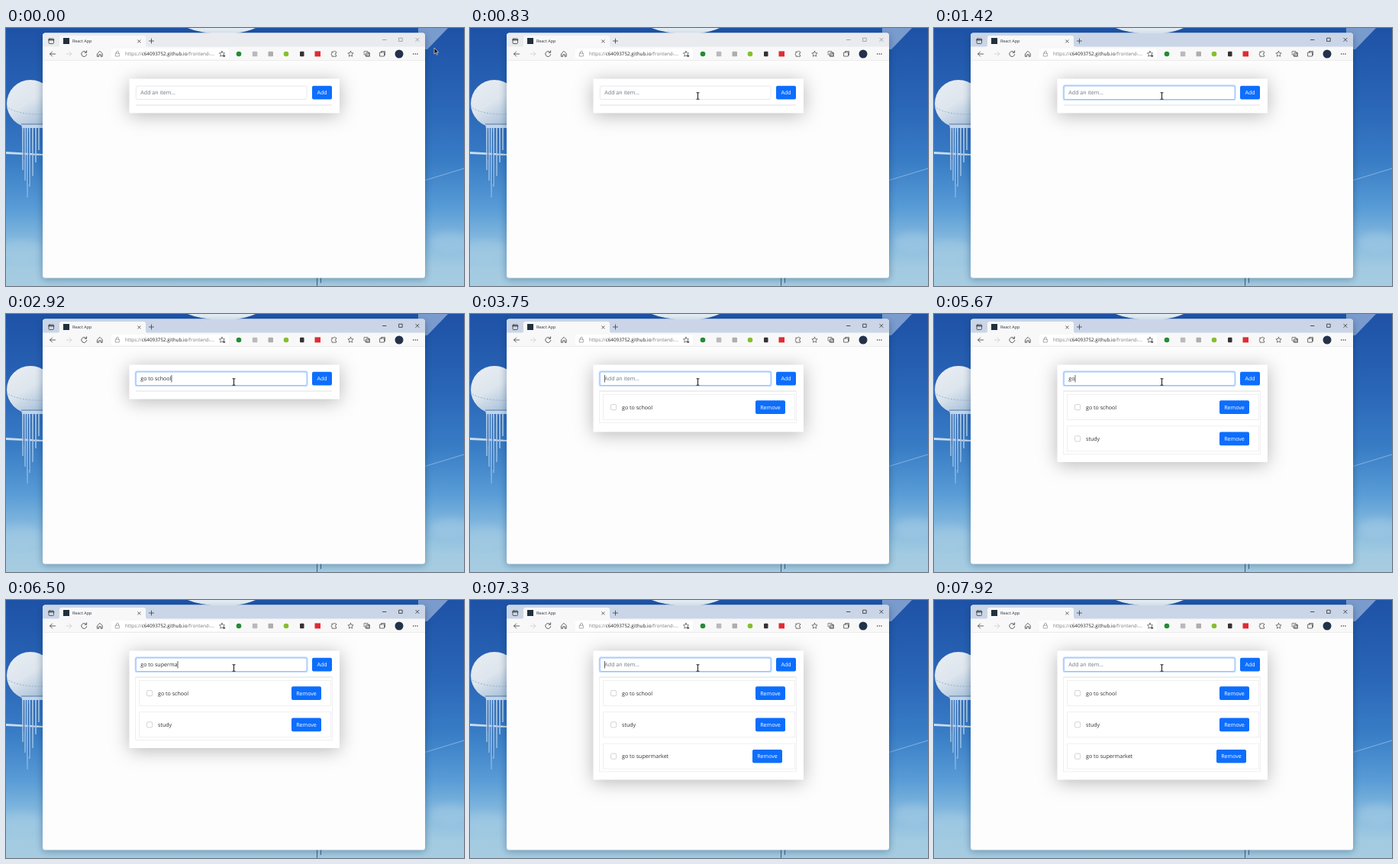
These frames come from a looping animation (600x338 px, 8000 ms). An HTML page:

```html
<!DOCTYPE html>
<html lang="en">
<head>
<meta charset="utf-8">
<title>Todo list</title>
<style>
html, body { margin: 0; width: 100%; height: 100%; overflow: hidden; background: #3577c2; }
svg { display: block; width: 100vw; height: 100vh; }
text { font: 7.1px "Open Sans", "Noto Sans", sans-serif; fill: #2b3035; white-space: pre; text-rendering: geometricPrecision; }
.mid { text-anchor: middle; fill: #fff; }
.line { fill: none; stroke: #444; stroke-width: .85; stroke-linecap: round; stroke-linejoin: round; }
.btn { fill: #0d6efd; }
.soft { fill: none; stroke: #e9e9eb; stroke-width: .7; }
.card { fill: #fff; filter: drop-shadow(0 3px 12px rgba(0,0,0,.28)); }
</style>
</head>
<body>
<svg viewBox="0 0 600 338" preserveAspectRatio="none">
  <defs>
    <linearGradient id="sky" x2="0" y2="1">
      <stop offset="0" stop-color="#1e52a6"/>
      <stop offset=".3" stop-color="#2a66b7"/>
      <stop offset=".52" stop-color="#397dc6"/>
      <stop offset=".7" stop-color="#599cd6"/>
      <stop offset=".82" stop-color="#83b8de"/>
      <stop offset=".93" stop-color="#a2cae1"/>
      <stop offset="1" stop-color="#a6cce0"/>
    </linearGradient>
    <linearGradient id="moon" x2=".6" y2="1">
      <stop offset="0" stop-color="#e9eef3"/>
      <stop offset=".55" stop-color="#dde5ed"/>
      <stop offset="1" stop-color="#a9c1da"/>
    </linearGradient>
    <linearGradient id="spire" gradientUnits="userSpaceOnUse" x1="0" y1="130" x2="0" y2="222">
      <stop offset="0" stop-color="#bdd2e8"/>
      <stop offset="1" stop-color="#7faedb"/>
    </linearGradient>
    <filter id="blur" x="-20%" y="-20%" width="140%" height="140%"><feGaussianBlur stdDeviation="5"/></filter>
    <clipPath id="page"><path d="M48 42.5H549V324q0 3.500-3.500 3.500H51.500q-3.500 0-3.500-3.500Z"/></clipPath>
  </defs>

  <!-- wallpaper -->
  <rect width="600" height="338" fill="url(#sky)"/>
  <path d="M238 0H327Q316 5 300 7H270Q250 5 238 0Z" fill="#e4edf4"/>
  <path d="M540 0H579L552 28H540Z" fill="#7a9bcd"/>
  <path d="M549 199.500L600 184" stroke="#86b1dd" stroke-width="1"/>
  <g fill="#b4d4e6" filter="url(#blur)" opacity=".35">
    <ellipse cx="20" cy="292" rx="30" ry="14"/>
    <ellipse cx="582" cy="280" rx="26" ry="13"/>
  </g>
  <path d="M0 162L48 165V167L0 165Z" fill="#cadcef"/>
  <path d="M22 128V186M25 130V200M28 130V222M31 130V208M35 130V194M39 130V176M43 130V160" stroke="url(#spire)" stroke-width="1.600"/>
  <path d="M23.500 134V172M29.600 136V204M37 134V165" stroke="#2b5f9f" stroke-width=".8"/>
  <circle cx="32" cy="99" r="31" fill="url(#moon)"/>
  <path d="M3 105Q20 114 48 113" fill="none" stroke="#8fa9c6" stroke-width=".9" stroke-dasharray="2 2"/>
  <path d="M20 126H48V131H21Z" fill="#c3d5e7"/>
  <path d="M20 126H48" stroke="#4a76ab" stroke-width="1"/>
  <path d="M407.500 327V338M412.500 327V334" stroke="#33608f" stroke-width="1"/>

  <!-- browser window -->
  <rect x="47" y="9" width="503" height="321" rx="5" fill="#0b3058" opacity=".32" filter="url(#blur)"/>
  <rect x="48" y="6.500" width="501" height="321" rx="3.500" fill="#fefdfe"/>
  <path id="bar" d="M48 25V10q0-3.500 3.500-3.500H545.500q3.500 0 3.500 3.500V25Z"/>
  <path d="M67 25q3 0 3-3V13q0-3 3-3H180q3 0 3 3V22q0 3 3 3Z" fill="#f8f8f9"/>
  <rect x="48" y="24.500" width="501" height="18" fill="#f8f8f9"/>
  <rect x="138" y="27" width="154" height="13.500" rx="2.500" fill="#fff"/>
  <path d="M48 42.500H549" stroke="#e3e3e5" stroke-width=".6"/>
  <g class="line">
    <rect x="56" y="14" width="6.500" height="6.500" rx="1"/>
    <path d="M56 15.500H62.500" stroke-width="1.700"/>
    <path d="M172.700 15.700l3.400 3.400m0-3.400l-3.400 3.400M187.500 17H193.500M190.500 14V20"/>
    <path d="M64.500 34H57.500m3-3l-3 3l3 3"/>
    <path d="M79 34H86m-3-3l3 3l-3 3" stroke="#d0d0d2"/>
    <path d="M105 31.700A3.500 3.500 0 1 0 105.800 34.500M105.600 29.800V32.200H103.200"/>
    <path d="M119.800 33.500L123 30.300L126.200 33.500V37.300H124.300V34.800H121.700V37.300H119.800Z"/>
    <path d="M143.700 33H148.300V37H143.700ZM144.600 33V31.600a1.400 1.400 0 0 1 2.800 0V33" stroke="#888" stroke-width=".7"/>
    <path id="star" d="M283 30.300l1.100 2.300l2.500.3l-1.900 1.800l.5 2.500l-2.200-1.200l-2.200 1.200l.5-2.500l-1.900-1.800l2.500-.3Z" stroke-width=".7"/>
    <use href="#star" x="168.500"/>
    <path d="M427 31.200H429.300a1.200 1.200 0 0 1 2.300 0H432.500V33a1 1 0 0 0 0 2.200V37.200H427V35.200a1.200 1.200 0 0 1 0-2.300Z" stroke-width=".75"/>
    <path d="M469.500 30.500H474V35H469.500ZM471 36.500H475.500V32M472 32.500H476.500V37.300H472Z" stroke-width=".65"/>
    <path d="M490 32H495.500V37H490ZM491.500 32V30.500H496.500V35.500" stroke-width=".75"/>
  </g>
  <circle cx="285.700" cy="36.500" r="1.500" fill="#666"/>
  <circle cx="305" cy="34" r="3.300" fill="#238c38"/>
  <rect x="322.800" y="30.700" width="6.500" height="6.500" rx="1" fill="#b9babc"/>
  <rect x="343.500" y="30.700" width="6.500" height="6.500" rx="1" fill="#adaeb0"/>
  <circle cx="367" cy="34" r="3.300" fill="#84bf2c"/>
  <rect x="385" y="30.700" width="5.500" height="6.500" rx="1" fill="#333"/>
  <rect x="404.500" y="30.400" width="7.500" height="7" fill="#e02b35"/>
  <circle cx="515" cy="34" r="5.500" fill="#22324a"/>
  <g fill="#333"><circle cx="533.700" cy="34" r=".75"/><circle cx="536.300" cy="34" r=".75"/><circle cx="538.900" cy="34" r=".75"/></g>
  <rect x="75" y="13" width="8" height="8" fill="#22303c"/>
  <text x="87" y="19.100" style="font-size:5.400px">React App</text>
  <text x="156" y="36.300" style="font-size:6.350px;fill:#77797c">https://<tspan fill="#222">c64093752.github.io</tspan>/frontend-...</text>
  <path id="controls" class="line" d="M493.500 15.500H498M515 13.200H519.200V17.400H515ZM536.800 13.300l4.200 4.200m0-4.200l-4.200 4.200" stroke-linecap="butt"/>

  <!-- page -->
  <g clip-path="url(#page)">
    <rect id="card" class="card" x="161.500" y="66.500" width="275.500" height="45"/>
    <path d="M170 101H427" stroke="#d4d5d7" stroke-width=".7"/>
    <rect id="ring" x="168.700" y="74.300" width="226.800" height="20.800" rx="3.200" fill="#c2dbfe"/>
    <rect id="field" x="170.300" y="76" width="223.700" height="17.500" rx="2" fill="#fff" stroke-width=".8"/>
    <text id="typed" x="176.300" y="87.300"></text>
    <path id="caret" d="M0 80V89.500" stroke="#222" stroke-width=".7"/>
    <rect class="btn" x="401" y="75.700" width="26" height="17.700" rx="2"/>
    <text class="mid" x="414" y="87.300">Add</text>
    <rect id="list" class="soft" x="169.500" y="101" width="258"/>
    <g id="items"></g>
  </g>

  <g id="arrow"><path d="M0 0V8L1.900 6.300L3.200 9.200L4.500 8.600L3.200 5.800H5.700Z" fill="#111" stroke="#fff" stroke-width=".6"/></g>
  <path id="beam" d="M-2-4.300H-.6L0-3.800L.6-4.300H2M0-3.800V3.800M-2 4.300H-.6L0 3.800L.6 4.300H2" fill="none" stroke="#222" stroke-width="1.100"/>
</svg>
<script>
const $ = id => document.getElementById(id);
const LOOP = 8000, CLICK = 880, BLINK = 530, HINT = 'Add an item...';
const cardEnds = [111.5, 154.5, 194, 235.5];
const tasks = [
  { text: 'go to school', start: 1800, step: 90, add: 3250, shift: 0 },
  { text: 'study', start: 4830, step: 85, add: 5330, shift: 0 },
  { text: 'go to supermarket', start: 5560, step: 75, add: 7000, shift: -4 }
];

$('items').innerHTML = tasks.map((task, i) => `
  <g transform="translate(0 ${i * 41.3})">
    <rect class="soft" x="174.500" y="105.500" width="251" height="33"/>
    <rect x="184.500" y="118.500" width="7.200" height="7.200" rx="1.700" fill="#fff" stroke="#bfc1c4" stroke-width=".7"/>
    <text x="199" y="124.700">${task.text}</text>
    <g transform="translate(${task.shift})">
      <rect class="btn" x="374" y="113.300" width="39" height="17.700" rx="2"/>
      <text class="mid" x="393.500" y="124.700">Remove</text>
    </g>
  </g>`).join('');
const rows = [...$('items').children];

const show = (el, on) => el.setAttribute('visibility', on ? 'visible' : 'hidden');

function drawPointer(t) {
  const p = Math.min(1, Math.max(0, (t - 80) / 750));
  const e = p * p * (3 - 2 * p);
  const x = 561 - 262.5 * e, y = 26 + 63 * e;
  const overField = x < 394 && y > 76;
  for (const id of ['arrow', 'beam']) $(id).setAttribute('transform', `translate(${x} ${y})`);
  show($('arrow'), !overField);
  show($('beam'), overField);
}

function drawFocus(on) {
  show($('ring'), on);
  $('field').setAttribute('stroke', on ? '#86b7fe' : '#dfe2e6');
  $('bar').setAttribute('fill', on ? '#cad6e7' : '#e9ebee');
  $('controls').style.stroke = on ? '#333' : '#999';
}

function drawField(t) {
  let value = '', lastKey = CLICK;
  for (const { text, start, step, add } of tasks) {
    if (t >= add) lastKey = add;
    else if (t >= start) {
      const n = Math.min(text.length, Math.floor((t - start) / step) + 1);
      value = text.slice(0, n);
      lastKey = start + (n - 1) * step;
    }
  }
  const label = $('typed');
  label.textContent = value || HINT;
  label.style.fill = value ? '#2b3035' : '#6c757d';
  const x = 176.5 + (value ? label.getComputedTextLength() + .3 : 0);
  $('caret').setAttribute('transform', `translate(${x})`);
  show($('caret'), t >= CLICK && (t - lastKey) % (2 * BLINK) < BLINK);
}

function drawList(t) {
  const count = tasks.filter(task => t >= task.add).length;
  const end = cardEnds[count];
  rows.forEach((row, i) => show(row, i < count));
  $('card').setAttribute('height', end - 66.5);
  $('list').setAttribute('height', Math.max(0, 41.3 * count));
  show($('list'), count > 0);
}

function draw(now) {
  const t = now % LOOP;
  drawPointer(t);
  drawFocus(t >= CLICK);
  drawField(t);
  drawList(t);
}

const begin = performance.now();
function tick() {
  draw(performance.now() - begin);
  requestAnimationFrame(tick);
}
tick();
</script>
</body>
</html>
```
